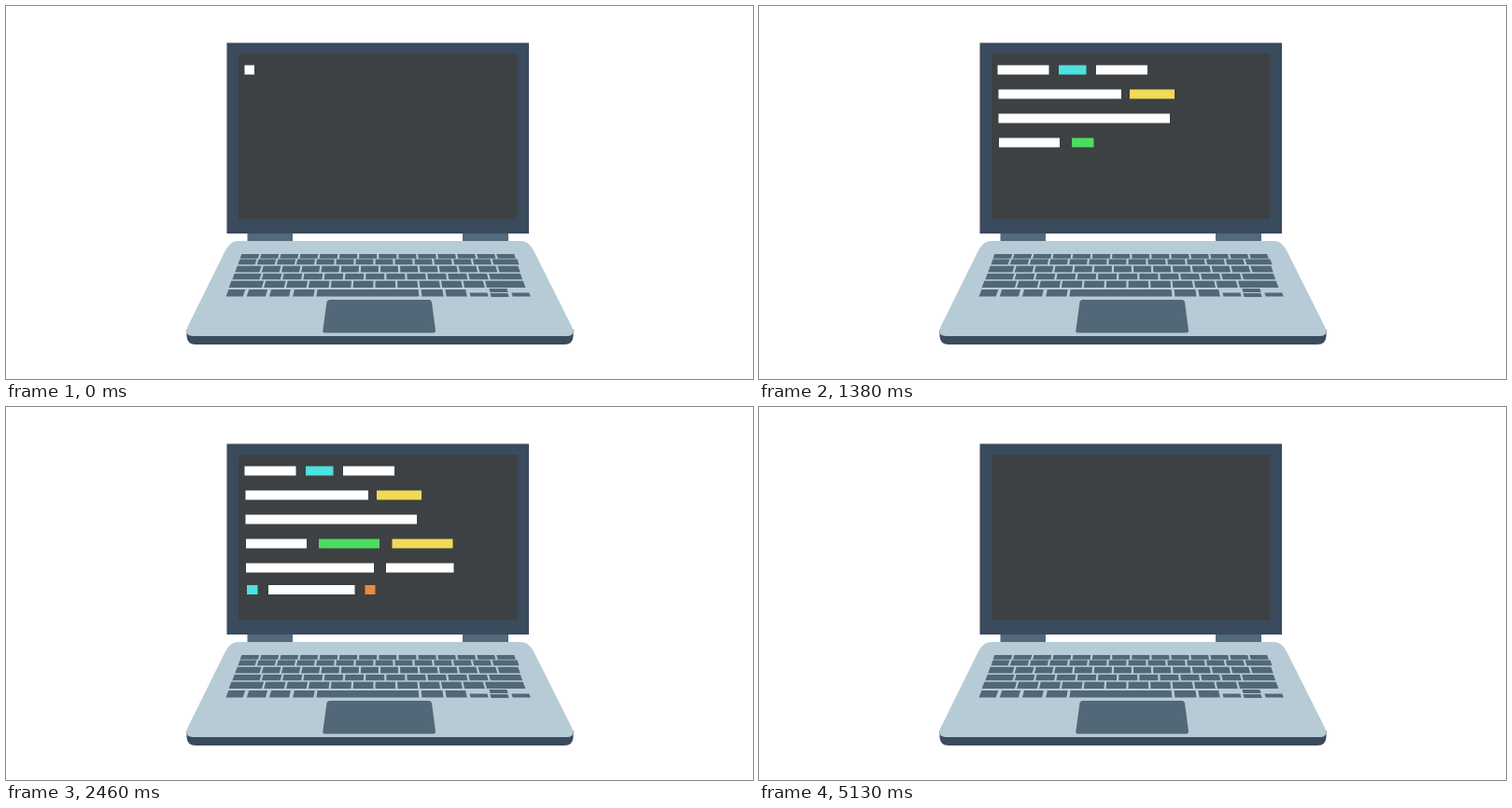
An HTML page that plays this animation: 800 by 400 pixels, repeating every 5.37 s.

```html
<!DOCTYPE html>
<html lang="en">
<head>
<meta charset="utf-8">
<title>Typing laptop</title>
<style>
  html, body { margin: 0; width: 100%; height: 100%; overflow: hidden; background: #fff; }
  svg { display: block; width: 800px; height: 400px; }
</style>
</head>
<body>
<svg viewBox="0 0 800 400">
  <rect width="800" height="400" fill="#fff"/>
  <path fill="#526a7b" d="M258.500 243H307V252.500H258.500ZM489 243H538V252.500H489Z"/>
  <rect x="236.500" y="39.500" width="323.500" height="204.500" fill="#3b4b5e"/>
  <rect x="249" y="51" width="298.500" height="177.500" fill="#3e4143"/>
  <path fill="#3b4b5e" d="M193.500 347H607.500V354Q607 363 598 363H203Q194 363 193.500 354Z"/>
  <path fill="#b7cbd6" d="M249 252H551Q560 252 565 262L606 344Q610 354 601 354H200Q191 354 194.500 344L235 262Q240 252 249 252Z"/>
  <path fill="#526878" d="M347 315H453Q455.500 315 456 317.500L460 348Q460 350.500 457.500 350.500H341.500Q339 350.500 339.300 348L343.500 317.500Q344 315 347 315Z"/>
  <g id="keys" fill="#526878"></g>
  <g id="code"></g>
  <rect id="caret" x="259.500" y="58.500" width="2" height="18" fill="#fff"/>
</svg>
<script>
const LOOP = 5370, GROW = 170, CURSOR = 10.5;
const WHITE = '#fff', CYAN = '#4be2e0', YELLOW = '#f0da58', GREEN = '#4cdc61', ORANGE = '#e48c42';

// Each line: top, start time, time per bar, then bars as [left, right, colour].
const lines = [
  { y: 63.5, start: 0, step: 190, bars: [[255.5, 310.5, WHITE], [321, 350.5, CYAN], [361, 416, WHITE]] },
  { y: 89.5, start: 570, step: 190, bars: [[256.5, 388, WHITE], [397, 445, YELLOW]] },
  { y: 115.5, start: 955, step: 190, bars: [[256.5, 440, WHITE]] },
  { y: 141.5, start: 1140, step: 187, bars: [[257, 322, WHITE], [335, 400, GREEN], [413.5, 478.5, YELLOW]] },
  { y: 167.5, start: 1714, step: 187, bars: [[257, 394, WHITE], [407, 479.5, WHITE]] },
  { y: 191, start: 2085, step: 184, bars: [[258, 269.5, CYAN], [281, 373.5, WHITE], [384.5, 463.5, ORANGE]] }
];

// Keyboard rows: top, height, left, right, first key width, last key width, number of keys.
const keyRows = [
  [266, 4.7, 251.5, 545, 19, 19, 14],
  [271.5, 5.7, 249.5, 548.5, 18, 27, 14],
  [278.7, 6.8, 246.5, 549.5, 26, 22, 14],
  [287, 6.2, 243.5, 552, 29, 34, 13],
  [294.7, 7.3, 240, 555, 35, 41, 12]
];
const bottomKeys = [
  [237, 255], [259, 279], [283, 304], [308, 330], [333, 442], [445, 468], [471, 493]
];
const arrowKeys = [[497, 307.5], [518, 303], [519, 308], [542, 307.5]];

const byId = id => document.getElementById(id);

function add(parent, tag, attrs) {
  const node = document.createElementNS('http://www.w3.org/2000/svg', tag);
  for (const name in attrs) node.setAttribute(name, attrs[name]);
  return parent.appendChild(node);
}

// A key whose sides lean towards the middle of the keyboard.
function addKey(left, right, y, height) {
  const lean = (x, dy) => x + (x - 398) * 0.0024 * dy;
  const half = height / 2;
  add(byId('keys'), 'path', {
    d: `M${lean(left, -half)} ${y}H${lean(right, -half)}L${lean(right, half)} ${y + height}H${lean(left, half)}Z`
  });
}

for (const [y, height, left, right, first, last, count] of keyRows) {
  const gap = 2.2;
  const width = (right - left - first - last - gap * (count - 1)) / (count - 2);
  let x = left;
  for (let i = 0; i < count; i++) {
    const w = i === 0 ? first : i === count - 1 ? last : width;
    addKey(x, x + w, y, height);
    x += w + gap;
  }
}
for (const [left, right] of bottomKeys) addKey(left, right, 304, 7.5);
for (const [x, y] of arrowKeys) addKey(x, x + 19, y, 4);

const bars = lines.flatMap(({ y, start, step, bars }) =>
  bars.map(([left, right, fill], i) => ({
    start: start + i * step,
    width: right - left,
    node: add(byId('code'), 'rect', { x: left, y, height: 10, fill })
  }))
);

const clamp = v => Math.min(1, Math.max(0, v));
const smooth = v => v * v * (3 - 2 * v);

function draw(t) {
  for (const { start, width, node } of bars) {
    const grown = CURSOR + (width - CURSOR) * smooth(clamp((t - start) / GROW));
    node.setAttribute('width', t < start ? 0 : grown);
  }
  byId('code').setAttribute('opacity', 1 - clamp((t - 4380) / 90));
  const shown = t < 4680 ? 0 : t < 4770 ? 0.8 : 1;
  byId('caret').setAttribute('opacity', shown * (1 - clamp((t - 5010) / 120)));
}

const origin = performance.now();
function tick() {
  draw((performance.now() - origin) % LOOP);
  requestAnimationFrame(tick);
}
draw(0);
requestAnimationFrame(tick);
</script>
</body>
</html>
```
